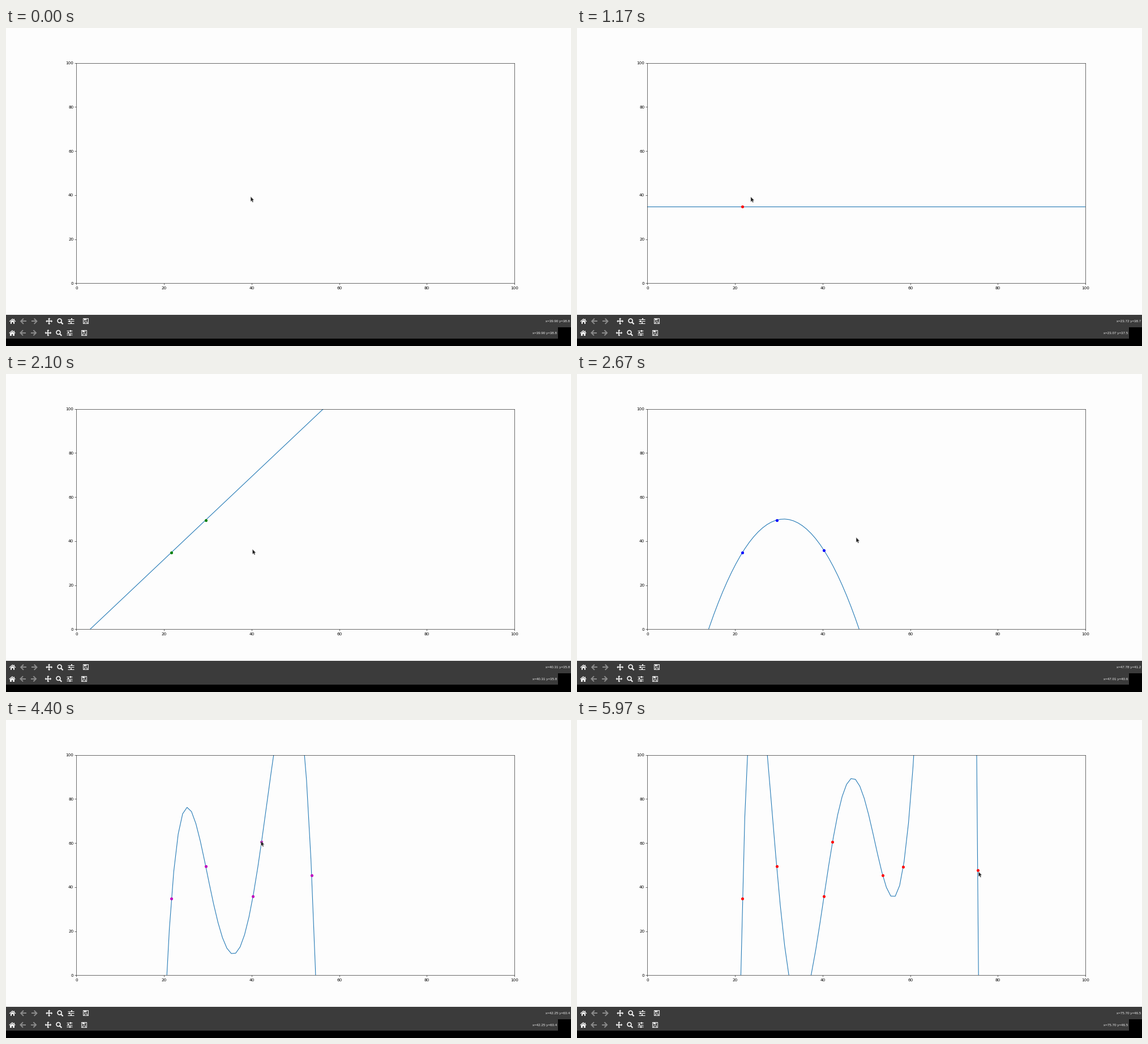
Animation, 998 px wide and 561 px high, one loop 6010 ms. Source, as a matplotlib script:

```python
import numpy as np
import matplotlib.pyplot as plt
from matplotlib.animation import FuncAnimation
from matplotlib.patches import Circle, Polygon, Rectangle

W, H, DPI = 998, 561, 64
LOOP_MS, FRAMES = 6010, 200
UI = 52 / DPI                                # scale of default point sizes
LEFT, RIGHT, TOP, BOTTOM = 124.4, 898.2, 61.52, 450.34
PAPER, BAR, LIGHT, DIM = "#fdfdfd", "#3b3b3b", "#f2f2f2", "#8c8c8c"
COLORS = "rgbcmy"

# mouse stops: arrival frame, departure frame, x, y
STOPS = [
    (0, 4, 39.9, 38.8),
    (26, 33, 21.7, 34.9), (48, 54, 29.5, 49.55), (66, 74, 40.31, 35.8),
    (100, 114, 53.7, 45.4), (131, 149, 42.25, 60.4), (152, 159, 58.4, 49.1),
    (188, 194, 75.42, 47.6),
    (196, FRAMES, 75.7, 46.5),
]
CLICK_DELAY = 4              # frames between arrival and click


def px(size):
    """Convert pixels to points."""
    return size * 72 / DPI


def mouse(i):
    """Eased position between the stops."""
    i = max(i, 0)
    for (_, leave, *a), (arrive, _, *b) in zip(STOPS, STOPS[1:]):
        if i < arrive:
            u = max(0, (i - leave) / (arrive - leave))
            return np.array(a) + (np.array(b) - a) * u * u * (3 - 2 * u)
    return np.array(STOPS[-1][2:])


def lagrange(points, x):
    total = np.zeros_like(x)
    for j, (xj, yj) in enumerate(points):
        term = np.full_like(x, yj)
        for m, (xm, _) in enumerate(points):
            if m != j:
                term *= (x - xm) / (xj - xm)
        total += term
    return total


fig = plt.figure(figsize=(W / DPI, H / DPI), dpi=DPI, facecolor=PAPER)

ax = fig.add_axes([LEFT / W, 1 - BOTTOM / H, (RIGHT - LEFT) / W,
                   (BOTTOM - TOP) / H], facecolor=PAPER)
ax.set(xlim=(0, 100), ylim=(0, 100))
ax.tick_params(labelsize=10 * UI, length=3.5 * UI, width=0.8 * UI, pad=3.5 * UI)
ax.tick_params(axis="x", pad=3.5 * UI + px(1))
for spine in ax.spines.values():
    spine.set_linewidth(0.8 * UI)
curve, = ax.plot([], [], color="#1f77b4", lw=1.5 * UI)
dots, = ax.plot([], [], "o", ms=6 * UI, mew=UI)

# pixel-space layer for toolbars and mouse pointer
ui = fig.add_axes([0, 0, 1, 1], zorder=5)
ui.set(xlim=(0, W), ylim=(H, 0))
ui.axis("off")


def box(x, y, w, h, color):
    ui.add_patch(Rectangle((x, y), w, h, fc=color, lw=0))


class Icon:
    """Draws shapes around a centre at a given scale."""

    def __init__(self, x, y, scale, color):
        self.at, self.scale, self.color = np.array([x, y]), scale, color

    def put(self, pts):
        return self.at + self.scale * np.array(pts, float)

    def line(self, pts, width):
        x, y = self.put(pts).T
        ui.plot(x, y, color=self.color, lw=px(width * self.scale),
                solid_capstyle="butt", solid_joinstyle="miter")

    def fill(self, pts):
        ui.add_patch(Polygon(self.put(pts), fc=self.color, lw=0))

    def rect(self, x, y, w, h, color=None):
        box(*self.put((x, y)), w * self.scale, h * self.scale,
            color or self.color)


def home(ic):
    ic.line([(-5.4, 0.6), (0, -4), (5.4, 0.6)], 1.3)
    ic.fill([(-3.8, 0.8), (0, -2.4), (3.8, 0.8)])
    ic.rect(-3.8, 0.7, 7.6, 4.1)
    ic.rect(-1.1, 1.9, 2.2, 3, BAR)
    ic.rect(2.6, -4.2, 1.4, 3)


def arrow(ic, way):
    ic.line([(-5 * way, 0), (4.2 * way, 0)], 2)
    ic.line([(-0.2 * way, -4.7), (4.5 * way, 0), (-0.2 * way, 4.7)], 2)


def back(ic):
    arrow(ic, -1)


def forward(ic):
    arrow(ic, 1)


def move(ic):
    for c, s in ((1, 0), (0, 1), (-1, 0), (0, -1)):
        turn = np.array([(c, s), (-s, c)])
        ic.line([(0, 0), (4.5 * c, 4.5 * s)], 1.7)
        ic.fill(np.array([(6, 0), (3.6, -2.4), (3.6, 2.4)]) @ turn)


def zoom(ic):
    ui.add_patch(Circle(ic.put((-0.8, -0.8)), 3.5 * ic.scale, fill=False,
                        ec=ic.color, lw=px(1.7 * ic.scale)))
    ic.line([(1.6, 1.6), (5.2, 5.2)], 2.2)


def sliders(ic):
    for y, knob in ((-3.6, 1.6), (0, -2.4), (3.6, 0.6)):
        ic.line([(-5.3, y), (5.3, y)], 1.1)
        ic.rect(knob - 1, y - 1.5, 2, 3)


def save(ic):
    ic.rect(-5.1, -5.1, 10.2, 10.2)
    ic.rect(-4, -4, 8, 8, BAR)
    ic.rect(-2.7, -4.6, 5, 3.6)
    ic.rect(0.4, -4, 1.1, 2.2, BAR)
    ic.rect(-3.1, 0.8, 6.2, 4)
    ic.rect(-2.1, 1.8, 4.2, 2.3, BAR)


def toolbar(x, y, scale):
    tools = home, back, forward, move, zoom, sliders, save
    for k, draw in enumerate(tools):
        gaps = (k >= 3) + (k >= 6)           # space between icon groups
        color = DIM if draw in (back, forward) else LIGHT
        draw(Icon(x + 19.2 * scale * (k + 0.37 * gaps), y, scale, color))


def readout(x, y):
    return ui.text(x, y, "", color="#ececec", ha="right", va="baseline",
                   family="Liberation Sans", size=px(6.3))


box(0, 506, W, 42, BAR)
box(0, 548, W, 13, "black")
box(975, 528, 23, 33, "black")
toolbar(11.5, 517.3, 1)
toolbar(11, 537.8, 0.98)
labels = [readout(996, 519.3), readout(973, 539.7)]

POINTER = np.array([(0, 0), (0, 8.8), (2, 7), (3.3, 10), (4.8, 9.3),
                    (3.5, 6.4), (6, 6.2)])
pointer = ui.add_patch(Polygon(POINTER, fc="#1c1c1c", ec="#c8c8c8", lw=px(0.5)))

grid = np.linspace(0, 100, 100)


def update(i):
    points = [(x, y) for arrive, _, x, y in STOPS[1:-1]
              if i >= arrive + CLICK_DELAY]
    if points:
        curve.set_data(grid, lagrange(points, grid))
        dots.set_data(*zip(*points))
        dots.set_color(COLORS[(len(points) - 1) % len(COLORS)])
    else:
        curve.set_data([], [])
        dots.set_data([], [])

    x, y = mouse(i) / 100
    tip = (LEFT + (RIGHT - LEFT) * x - 1, BOTTOM - (BOTTOM - TOP) * y - 2)
    pointer.set_xy(POINTER + tip)

    # each readout trails the pointer a little more
    for lag, label in enumerate(labels):
        label.set_text("x={:.2f} y={:.1f}".format(*mouse(i - lag)))
    return curve, dots, pointer, *labels


anim = FuncAnimation(fig, update, frames=FRAMES, interval=LOOP_MS / FRAMES,
                     repeat=True, repeat_delay=0, blit=False)
plt.show()
```
